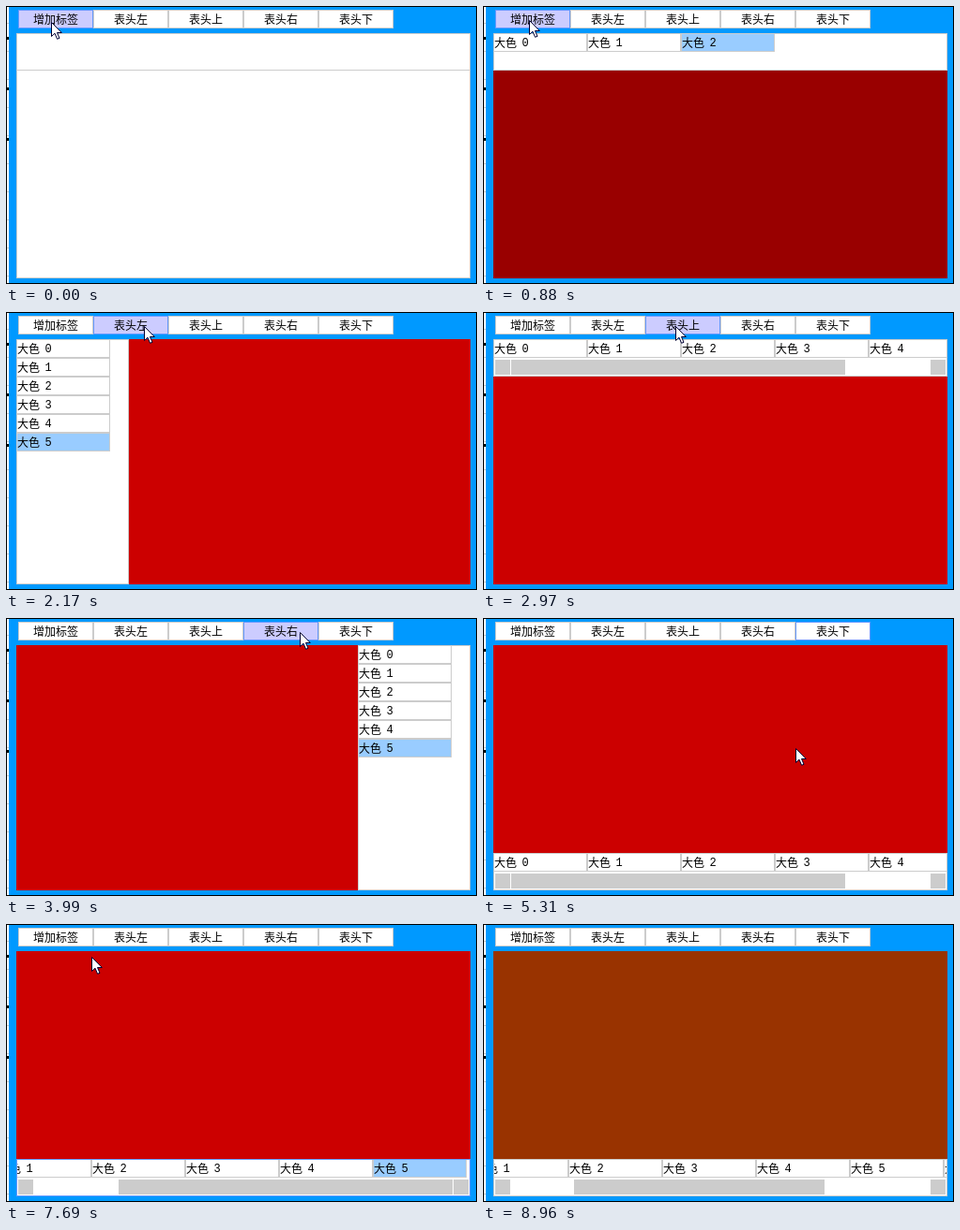
An HTML page with a canvas for the animation above (9.52 s loop, 502x297 px).

```html
<!DOCTYPE html>
<html lang="zh-CN">
<head>
<meta charset="utf-8">
<style>
  html, body { margin: 0; width: 100%; height: 100%; overflow: hidden; background: #09f; }
  canvas { display: block; }
</style>
</head>
<body>
<canvas id="stage" width="502" height="297"></canvas>
<script>
const ctx = document.getElementById('stage').getContext('2d');
const LOOP = 9520;
const LABELS = ['增加标签', '表头左', '表头上', '表头右', '表头下'];
const SIDES = ['left', 'top', 'right', 'bottom'];
const SHADES = ['#900', '#c00', '#930'];
const GRAY = '#ccc', FOCUS = '#69f';
const PANEL = { x: 11, y: 29, w: 484, h: 262 };
const TAB = { w: 100, h: 20 };
const VIEW = 480, TRACK = 446, SCROLL_MAX = 120;
const PRESS = 90;

// Release times of the clicks: six quick tabs, one per header side, two late tabs
const quickTabs = Array.from({ length: 6 }, (_, i) => 550 + 162 * i);
const lateTabs = [8140, 8540];
const tabTimes = [...quickTabs, ...lateTabs];
const sideTimes = [1930, 2970, 3720, 4380];
const drag = { start: 5940, end: 6840, x: 325 };

// Pointer glides; it rests between them
const glide = (start, end, x, y) => ({ start, end, x, y });
const toButton = (start, end, i) => glide(start, end, 50 + 78 * i, 16);
const glides = [
  glide(99, 100, 49, 17),
  toButton(250, 370, 0),
  ...sideTimes.map((_, i) => {
    const start = (i ? sideTimes[i - 1] : quickTabs[5]) + 180;
    return toButton(start, start + 240, i + 1);
  }),
  glide(4379, 4380, 340, 88),
  glide(5309, 5310, 334, 140),
  glide(5310, 5760, drag.x, 277),
  glide(drag.start, drag.end, 489, 273),
  glide(7240, 7690, 92, 36),
  toButton(7690, 8050, 0),
  glide(8810, 8960, 478, 25)
];

const clamp01 = v => Math.min(1, Math.max(0, v));

function pointerAt(t) {
  let x = 49, y = 18;
  for (const g of glides) {
    const k = clamp01((t - g.start) / (g.end - g.start));
    x += (g.x - x) * k;
    y += (g.y - y) * k;
  }
  return { x: Math.round(x), y: Math.round(y) };
}

function inside(p, x, y, w, h) {
  return p.x >= x && p.x < x + w && p.y >= y && p.y < y + h;
}

function fill(color, x, y, w, h) {
  ctx.fillStyle = color;
  ctx.fillRect(x, y, w, h);
}

function outline(color, x, y, w, h) {
  ctx.strokeStyle = color;
  ctx.strokeRect(x + 0.5, y + 0.5, w - 1, h - 1);
}

function box(color, border, x, y, w, h) {
  fill(color, x, y, w, h);
  outline(border, x, y, w, h);
}

function write(text, x, y, align = 'left', family = '"Noto Sans CJK SC", "Noto Sans CJK", sans-serif') {
  ctx.font = '12px ' + family;
  ctx.textAlign = align;
  ctx.fillStyle = '#000';
  ctx.fillText(text, x, y);
}

function drawBackground() {
  fill('#000', 0, 0, 502, 297);
  fill('#fff', 1, 1, 2, 295);
  fill('#09f', 3, 1, 498, 295);
  for (let y = 18; y < 290; y += 30) fill(GRAY, 1, y, 2, 1);
  for (let y = 33; y < 150; y += 54) fill('#000', 1, y, 2, 3);
}

function drawButtons(t, pointer) {
  LABELS.forEach((label, i) => {
    const x = 13 + 80 * i;
    const hover = inside(pointer, x, 4, 80, 20);
    const releases = i ? [sideTimes[i - 1]] : tabTimes;
    const pressed = releases.some(up => t >= up - PRESS && t < up);
    const focused = i === 4 && t >= sideTimes[3] && t < drag.start;
    box(pressed ? '#99f' : hover ? '#ccf' : '#fff', hover || focused ? FOCUS : GRAY, x, 4, 80, 20);
    write(label, x + 40, 19, 'center');
  });
}

function drawTab(index, selected, x, y) {
  box(selected ? '#9cf' : '#fff', GRAY, x, y, TAB.w, TAB.h);
  write('大色', x + 1, y + 15);
  write(index, x + 34, y + 14, 'center', '"Liberation Mono", monospace');
}

function drawScrollbar(y, count, scroll, active) {
  const scale = TRACK / (count * TAB.w);
  const bar = (color, x, w) => fill(color, x, y + 2, w, 16);
  bar(GRAY, 13, 16);
  bar(GRAY, 477, 16);
  bar(active ? '#999' : GRAY, Math.ceil(30 + scroll * scale), Math.floor(VIEW * scale));
}

function drawPanel(t, pointer) {
  const count = tabTimes.filter(time => t >= time).length;
  const side = SIDES[sideTimes.filter(time => t >= time).length - 1] || 'top';
  const vertical = side === 'left' || side === 'right';
  const { x, y, w, h } = PANEL;
  const head = vertical
    ? { x: side === 'left' ? x : x + w - 120, y, w: 120, h }
    : { x, y: side === 'top' ? y : y + h - 40, w, h: 40 };
  const scroll = t < drag.start ? 0
    : t < drag.end ? clamp01((pointer.x - drag.x) / 90) * SCROLL_MAX
    : SCROLL_MAX;

  ctx.save();
  ctx.beginPath();
  ctx.rect(x, y, w, h);
  ctx.clip();
  const page = SHADES[Math.floor((count - 1) / 3)];
  box(page || '#fff', page || GRAY, x, y, w, h);
  fill('#fff', head.x, head.y, head.w, head.h);

  for (let i = 0; i < count; i++) {
    const selected = i === count - 1;
    if (vertical) drawTab(i, selected, head.x, head.y + i * TAB.h);
    else drawTab(i, selected, Math.round(head.x + i * TAB.w - scroll), head.y);
  }
  if (!vertical && count * TAB.w > VIEW) {
    const dragging = t >= drag.start && t < drag.end;
    const hover = inside(pointer, 30, head.y + 22, 356, 16);
    drawScrollbar(head.y + 20, count, scroll, dragging || hover);
  }
  const focused = t >= drag.start && t < lateTabs[0];
  outline(focused ? FOCUS : GRAY, head.x, head.y, head.w, head.h);
  ctx.restore();
}

const ARROW = new Path2D('M.5 .5V15.5L4 12.2L6.6 18.3L9 17.3L6.5 11.5H11.3Z');

function drawPointer({ x, y }) {
  ctx.save();
  ctx.translate(x - 1, y - 1);
  ctx.fillStyle = '#fff';
  ctx.strokeStyle = '#003';
  ctx.fill(ARROW);
  ctx.stroke(ARROW);
  ctx.restore();
}

function frame(now) {
  const t = now % LOOP;
  const pointer = pointerAt(t);
  drawBackground();
  drawButtons(t, pointer);
  drawPanel(t, pointer);
  if (t < 8960) drawPointer(pointer);
  requestAnimationFrame(frame);
}
frame(0);
</script>
</body>
</html>
```
